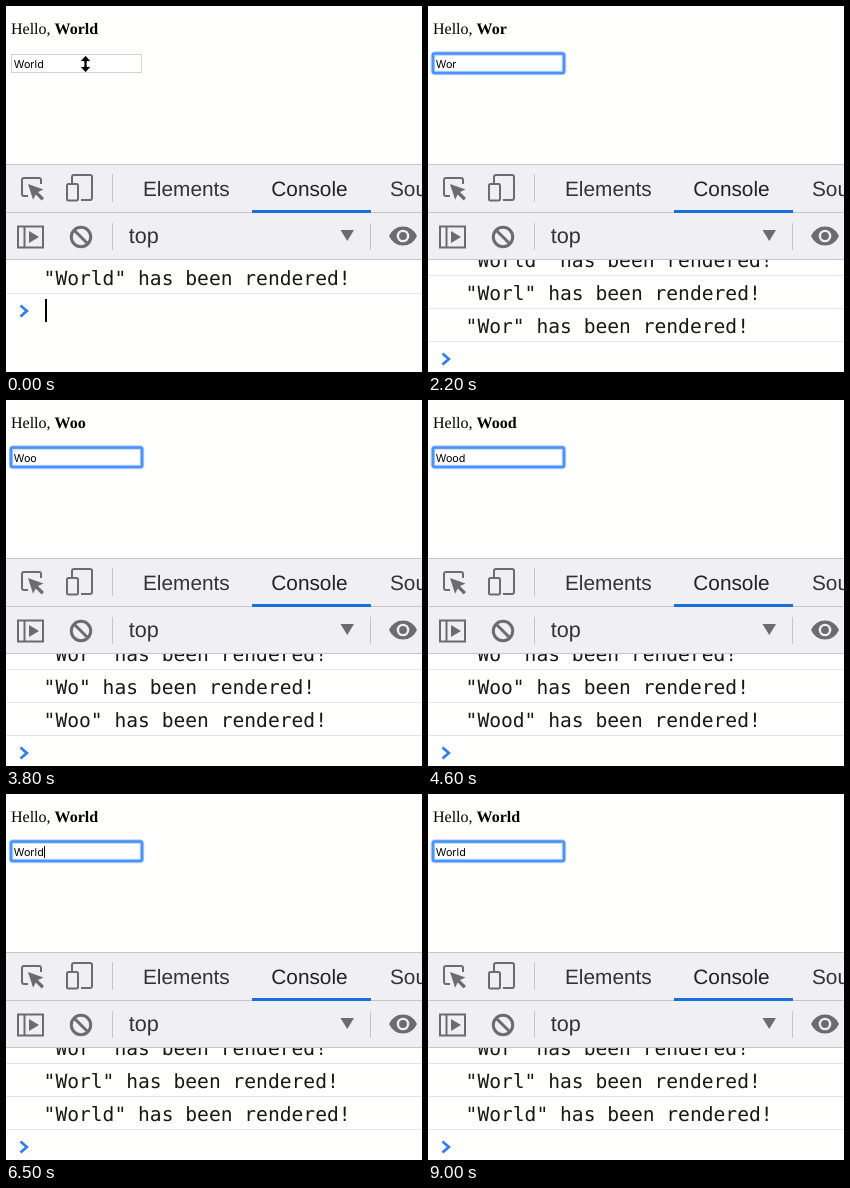
These frames come from a looping animation (416 px wide and 366 px high, 9100 ms). An HTML page:

```html
<!DOCTYPE html>
<html lang="en">
<head>
<meta charset="utf-8">
<title>Console rendering</title>
<style>
  html, body { margin: 0; width: 100%; height: 100%; overflow: hidden; background: #fffffd; }
  svg { display: block; width: 416px; height: 366px; }
  text { text-rendering: geometricPrecision; }
  .page { font: 16px "Liberation Serif", serif; fill: #000; }
  .field { font: 10.8px Inter, sans-serif; fill: #000; }
  .tab { font: 20.8px "Liberation Sans", sans-serif; fill: #333; }
  .tab.active { fill: #222; }
  .tab.context { font-size: 21.6px; }
  .log { font: 19.63px "DejaVu Sans Mono", monospace; fill: #181818; white-space: pre; }
  .icon { fill: none; stroke: #6c6c70; stroke-width: 2; }
  .icon.bold { stroke-width: 3; }
  .solid { fill: #6c6c70; stroke: none; }
  .rule { stroke: #c6c6ca; }
  .row { stroke: #e5e5ed; }
</style>
</head>
<body>
<svg viewBox="0 0 416 366">
  <defs>
    <clipPath id="pane"><rect y="254" width="416" height="112"/></clipPath>
  </defs>
  <rect width="416" height="366" fill="#fffffd"/>

  <text class="page" x="5" y="28">Hello, <tspan id="name" font-weight="bold">World</tspan></text>
  <rect x="5.5" y="48.5" width="130" height="18" fill="#fff" stroke="#d3d3cf"/>
  <g id="ring" fill="none" stroke="#4b93f5">
    <rect x="5" y="47.5" width="131" height="19.5" rx="2" stroke-width="4.5" opacity=".4"/>
    <rect x="5" y="47.5" width="131" height="19.5" rx="1.5" stroke-width="2.6"/>
  </g>
  <text class="field" id="value" x="7.8" y="62">World</text>
  <rect id="caret" y="52" width="1" height="12"/>
  <path id="pointer" d="M79.5 49.5l5.5 6h-4v5h4l-5.5 6-5.5-6h4v-5h-4z" stroke="#fff" stroke-width=".8"/>

  <g id="console" clip-path="url(#pane)">
    <g id="scroll">
      <g id="rows"></g>
      <g id="prompt">
        <path d="M14.5 299.5l6.3 5.5-6.3 5.5" fill="none" stroke="#367cf1" stroke-width="2.8"/>
        <rect id="idle" x="39" y="293" width="2" height="23"/>
      </g>
    </g>
  </g>

  <rect y="158" width="416" height="96" fill="#efeff4"/>
  <path class="rule" d="M0 158.5h416M0 206.5h416M0 253.5h416M106.5 168v28M106.5 217v27M364.5 217v27"/>
  <rect x="246" y="204" width="119" height="3" fill="#1a6fdc"/>

  <text class="tab" x="137" y="190">Elements</text>
  <text class="tab active" x="265.3" y="190">Console</text>
  <text class="tab" x="384" y="190">Sources</text>
  <text class="tab context" x="122.7" y="237">top</text>

  <path class="icon" d="M22 190h-4q-2 0-2-2v-14q0-2 2-2h15q2 0 2 2v4"/>
  <path class="solid" d="M22 178l15.5 5.5-5.5 2.6 6 6-2.3 2.3-6-6-2.6 5.4z"/>
  <path class="icon" d="M66 177v-6q0-2 2-2h16q2 0 2 2v21q0 2-2 2h-9"/>
  <rect class="icon" x="61" y="178" width="11" height="16.5" rx="1.5"/>

  <path class="icon" d="M12 220.5h25v21h-25zM18.5 220.5v21"/>
  <path class="solid" d="M23 225l10 6-10 6z"/>
  <g class="icon bold">
    <circle cx="75" cy="231" r="9.7"/>
    <path d="M68.2 224.2l13.6 13.6"/>
  </g>
  <path class="solid" d="M334.5 224h13.5l-6.75 11z"/>
  <path class="solid" d="M383 230q4.5-9.5 14-9.5t14 9.5q-4.5 9.5-14 9.5t-14-9.5z"/>
  <circle cx="397" cy="230" r="6.3" fill="#efeff4"/>
  <circle class="solid" cx="397" cy="230" r="3.9"/>
</svg>
<script>
  const LOOP = 9100, FOCUS = 700, ROW = 33, VISIBLE = 81;
  const edits = [
    [0, "World"], [1300, "Worl"], [1500, "Wor"], [2700, "Wo"], [3200, "Woo"],
    [4000, "Wood"], [4800, "Woo"], [5000, "Wo"], [5700, "Wor"], [5950, "Worl"], [6200, "World"]
  ];
  const $ = id => document.getElementById(id);
  const show = (id, on) => { $(id).style.visibility = on ? "visible" : "hidden"; };

  function add(parent, tag, attrs) {
    const el = document.createElementNS("http://www.w3.org/2000/svg", tag);
    for (const key in attrs) el.setAttribute(key, attrs[key]);
    return parent.appendChild(el);
  }

  const rows = edits.map(([, word], i) => {
    const row = add($("rows"), "g", { transform: `translate(0 ${254 + i * ROW})` });
    add(row, "text", { class: "log", x: 37.6, y: 25 }).textContent = `"${word}" has been rendered!`;
    add(row, "path", { class: "row", d: `M0 ${ROW + 0.5}h416` });
    return row;
  });

  let shown = 0;
  function setCount(count) {
    if (count === shown) return;
    shown = count;
    const word = edits[count - 1][1];
    $("name").textContent = $("value").textContent = word;
    $("caret").setAttribute("x", Math.round(8 + $("value").getComputedTextLength()));
    rows.forEach((row, i) => { row.style.display = i < count ? "" : "none"; });
    $("prompt").setAttribute("transform", `translate(0 ${(count - 1) * ROW})`);
    $("scroll").setAttribute("transform", `translate(0 ${-Math.max(0, count * ROW - VISIBLE)})`);
  }

  function draw(now) {
    const t = now % LOOP;
    const count = edits.filter(([at]) => at <= t).length;
    const focused = t >= FOCUS;
    const since = t - Math.max(FOCUS, edits[count - 1][0]);
    setCount(count);
    show("ring", focused);
    show("pointer", !focused);
    show("caret", focused && since % 1000 < 500);
    show("idle", !focused && t < 500);
    requestAnimationFrame(draw);
  }
  draw(0);
</script>
</body>
</html>
```
